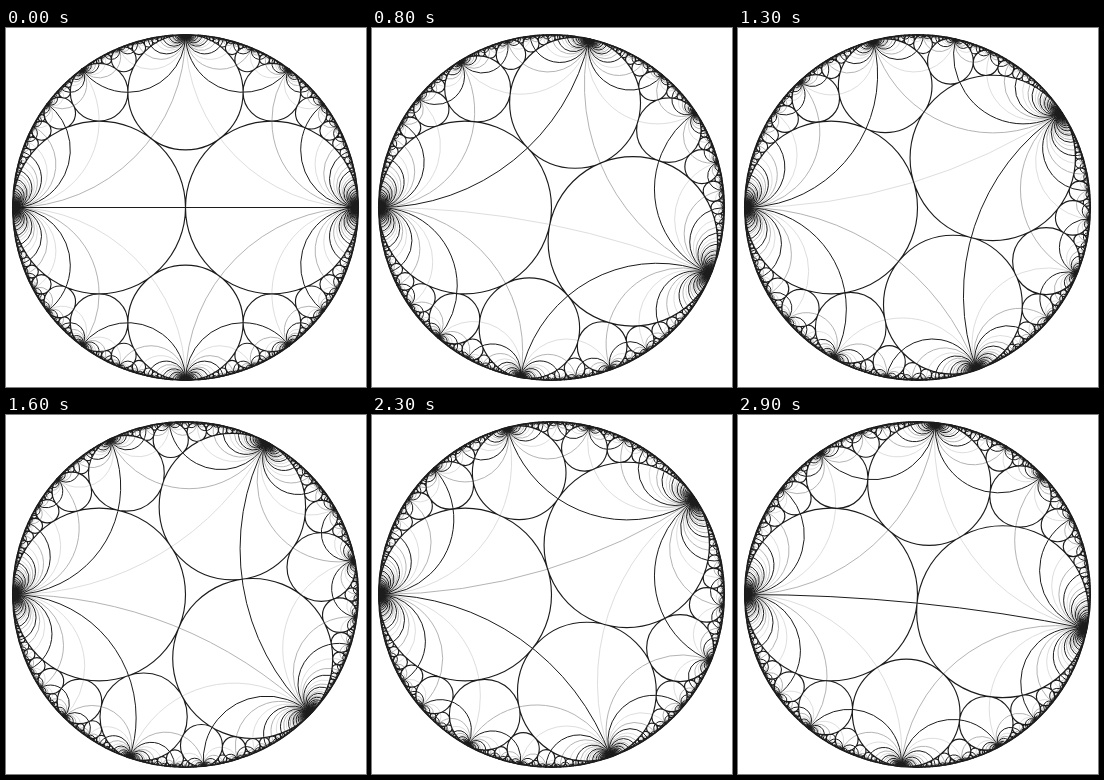
An HTML page with a canvas that plays this animation: 360x359 px, repeating every 3 s.

```html
<!DOCTYPE html>
<html lang="en">
<head>
<meta charset="utf-8">
<title>Ford circles and Farey tessellation in the disc</title>
<style>
html, body { margin: 0; width: 100%; height: 100%; overflow: hidden; background: #fff; }
canvas { display: block; }
</style>
</head>
<body>
<canvas id="stage" width="360" height="359"></canvas>
<script>
const ctx = document.getElementById("stage").getContext("2d");
const CX = 179.5, CY = 179.5, R = 172.8;
const MIN_ARC = 1.1, MIN_CIRCLE = 0.45, SPAN = 130;
const LOOP = 3000, STEP = 100;
const INK = "#1c1c1c";
const SHADES = [INK, "#b4b4b4", "#dedede"];
const mod3 = n => ((n % 3) + 3) % 3;

// Boundary point x of the half-plane as an angle on the disc
const angle = x => 2 * Math.atan(x);

function addCircle(paths, x, q) {
  const h = 1 / (q * q * (1 + x * x));
  const r = R * h / (1 + h);
  if (r < MIN_CIRCLE) return;
  const a = angle(x);
  const px = CX + (R - r) * Math.cos(a), py = CY - (R - r) * Math.sin(a);
  paths.circles.moveTo(px + r, py);
  paths.circles.arc(px, py, r, 0, 2 * Math.PI);
}

// Geodesic joining two boundary angles a < b
function addArc(path, a, b) {
  const d = (b - a) / 2, m = (a + b) / 2;
  if (Math.cos(d) < 1e-5) {
    path.moveTo(CX + R * Math.cos(a), CY - R * Math.sin(a));
    path.lineTo(CX + R * Math.cos(b), CY - R * Math.sin(b));
    return;
  }
  const dist = R / Math.cos(d), r = R * Math.tan(d);
  const px = CX + dist * Math.cos(m), py = CY - dist * Math.sin(m);
  const from = -m + Math.PI - (Math.PI / 2 - d);
  path.moveTo(px + r * Math.cos(from), py + r * Math.sin(from));
  path.arc(px, py, r, from, from + Math.PI - 2 * d);
}

// Edge p/q - u/v with its colour; the triangle below takes the other two
function addEdge(paths, shift, p, q, u, v, colour) {
  const a = angle(p / q + shift), b = angle(u / v + shift);
  if (R * (b - a) / 2 < MIN_ARC) return;
  addArc(paths.edges[colour], a, b);
  const mp = p + u, mq = q + v;
  addCircle(paths, mp / mq + shift, mq);
  addEdge(paths, shift, p, q, mp, mq, mod3(colour - 1));
  addEdge(paths, shift, mp, mq, u, v, mod3(colour + 1));
}

function build(shift) {
  const paths = { circles: new Path2D(), edges: SHADES.map(() => new Path2D()) };
  for (let n = -SPAN; n <= SPAN; n++) {
    const x = n + shift, a = angle(x);
    if (x < 0) addArc(paths.edges[mod3(n)], -Math.PI, a);
    else addArc(paths.edges[mod3(n)], a, Math.PI);
    addCircle(paths, x, 1);
    addEdge(paths, shift, n, 1, n + 1, 1, mod3(n - 1));
  }
  paths.circles.moveTo(CX, CY);
  paths.circles.arc(CX - R / 2, CY, R / 2, 0, 2 * Math.PI);
  return paths;
}

function stroke(path, colour, width) {
  ctx.strokeStyle = colour;
  ctx.lineWidth = width;
  ctx.stroke(path);
}

function draw(shift) {
  const paths = build(shift);
  const rim = new Path2D();
  rim.arc(CX, CY, R, 0, 2 * Math.PI);
  ctx.fillStyle = "#fff";
  ctx.fillRect(0, 0, 360, 359);
  for (let c = 2; c >= 0; c--) stroke(paths.edges[c], SHADES[c], 1);
  stroke(paths.circles, INK, 1.15);
  stroke(rim, INK, 1.5);
}

let shown = -1;
const start = performance.now();
function tick(now) {
  const step = Math.floor((Math.max(0, now - start) % LOOP) / STEP);
  if (step !== shown) {
    shown = step;
    draw(step * STEP / 1000);
  }
  requestAnimationFrame(tick);
}
tick(start);
</script>
</body>
</html>
```
